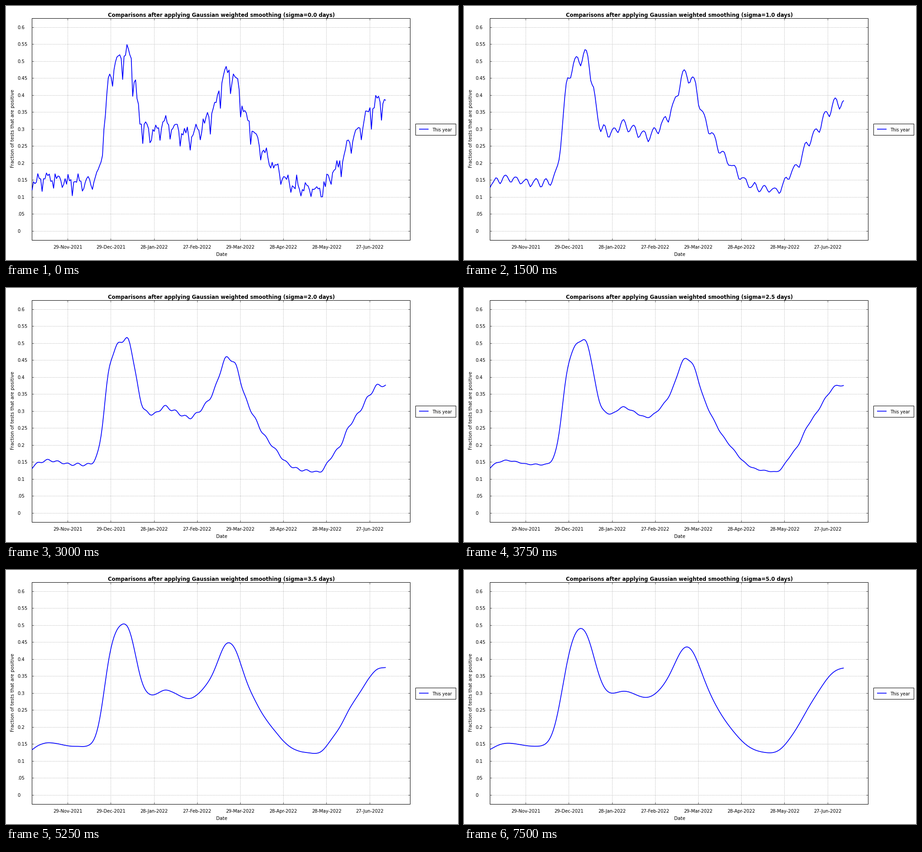
Write a matplotlib script that moves like this. It is 998 px wide and 561 px high and loops after 8 s.

```python
import numpy as np
import matplotlib.pyplot as plt
from matplotlib.animation import FuncAnimation
from matplotlib.patches import Rectangle

W, H = 998, 561
LEFT, RIGHT, TOP, BOTTOM = 57.5, 892.5, 26.5, 516.5
ZERO_Y, UNIT = 496.9, 750      # pixel row of value 0, pixels per 1.0
DAY = 3.175                    # pixels per day
LAST_DAY = 246
SHIFT_DAY = 78                 # the reporting week moves by two days here
BLUE = "#0000ff"

plt.rcParams["font.family"] = "DejaVu Sans"
plt.rcParams["lines.scale_dashes"] = False

# Turning points of the underlying trend: (day, positive fraction)
TREND = [(0, .142), (12, .157), (26, .143), (41, .142), (47, .172),
         (53, .43), (57, .485), (67, .526), (72, .425), (75, .312),
         (84, .286), (92, .316), (110, .276), (121, .318), (128, .37),
         (134, .468), (143, .434), (147, .347), (160, .236), (175, .155),
         (183, .13), (201, .118), (208, .165), (215, .198), (221, .266),
         (226, .285), (234, .345), (240, .378), (246, .378)]
LEAD, LEAD_VALUE = 20, .122    # quiet days before the visible range


def daily_values():
    day = np.arange(LAST_DAY + 1)
    trend = np.interp(day, *zip(*TREND))
    # weekly rhythm: a gentle wave plus one under-reported day
    peak = np.where(day < SHIFT_DAY, 4, 2)
    wave = .011 * np.cos(2 * np.pi * (day - peak) / 7)
    dip = .12 * trend * (((day - peak) % 7 == 3) - 1 / 7)
    # differenced noise cancels out once it is smoothed
    noise = np.diff(np.random.default_rng(4).normal(0, .005, len(day) + 1))
    return trend + wave - dip + noise


def smooth(raw, sigma):
    if sigma == 0:
        return raw
    full = np.r_[np.full(LEAD, LEAD_VALUE), raw]
    i = np.arange(len(full))
    weight = np.exp(-.5 * ((i[:, None] - i) / sigma) ** 2)
    return (weight @ full / weight.sum(axis=1))[LEAD:]


fig = plt.figure(figsize=(W / 72, H / 72), dpi=72, facecolor="white")
ax = fig.add_axes([0, 0, 1, 1])
ax.set_xlim(0, W)
ax.set_ylim(H, 0)
ax.axis("off")


def label(x, y, text, size=10, ha="center", **kw):
    return ax.text(x, y, text, fontsize=size, ha=ha, va="baseline", **kw)


def grid_line(x, y):
    ax.plot(x, y, color="#969696", lw=.8, ls=(0, (1.4, 1.93)), zorder=1)


def tick(x, y):
    ax.plot(x, y, color="black", lw=.6, zorder=2)


start = np.datetime64("2021-11-29")
months = "Jan Feb Mar Apr May Jun Jul Aug Sep Oct Nov Dec".split()
for i in range(8):
    x = 136.2 + 95.2 * i
    grid_line([x, x], [TOP, BOTTOM])
    tick([x, x], [TOP, TOP + 4])
    tick([x, x], [BOTTOM - 4, BOTTOM])
    year, month, dom = str(start + 30 * i).split("-")
    label(x + .3, 536.4, f"{dom}-{months[int(month) - 1]}-{year}")

for i in range(13):
    y = ZERO_Y - 37.5 * i
    grid_line([LEFT, RIGHT], [y, y])
    tick([LEFT, LEFT + 4], [y, y])
    tick([RIGHT - 4, RIGHT], [y, y])
    label(25.5, y + 4, ".05" if i == 1 else f"{i * .05:g}", ha="left")

ax.add_patch(Rectangle((LEFT, TOP), RIGHT - LEFT, BOTTOM - TOP,
                       fill=False, ec="black", lw=1, zorder=2))
label(476, 552.5, "Date", 10.3)
label(18, 270.5, "Fraction of tests that are positive", 10.4,
      rotation=90, rotation_mode="anchor")

ax.add_patch(Rectangle((904.5, 259.5), 89, 25, fc="white", ec="black", lw=1))
ax.plot([912, 933.5], [272, 272], color=BLUE, lw=1.7,
        solid_capstyle="butt")
label(941, 277, "This year", 9.5, ha="left")

title = label(476, 24, "", 11.62, weight="bold")
raw = daily_values()
curve, = ax.plot(LEFT + DAY * np.arange(len(raw)), ZERO_Y - UNIT * raw,
                 color=BLUE, lw=1.7, solid_joinstyle="round",
                 solid_capstyle="butt", zorder=3)


def draw(frame):
    sigma = frame // 3 * .5
    curve.set_ydata(ZERO_Y - UNIT * smooth(raw, sigma))
    title.set_text("Comparisons after applying Gaussian weighted smoothing "
                   f"(sigma={sigma:.1f} days)")
    return curve, title


anim = FuncAnimation(fig, draw, frames=32, interval=250, repeat=True,
                     repeat_delay=0)
plt.show()
```
